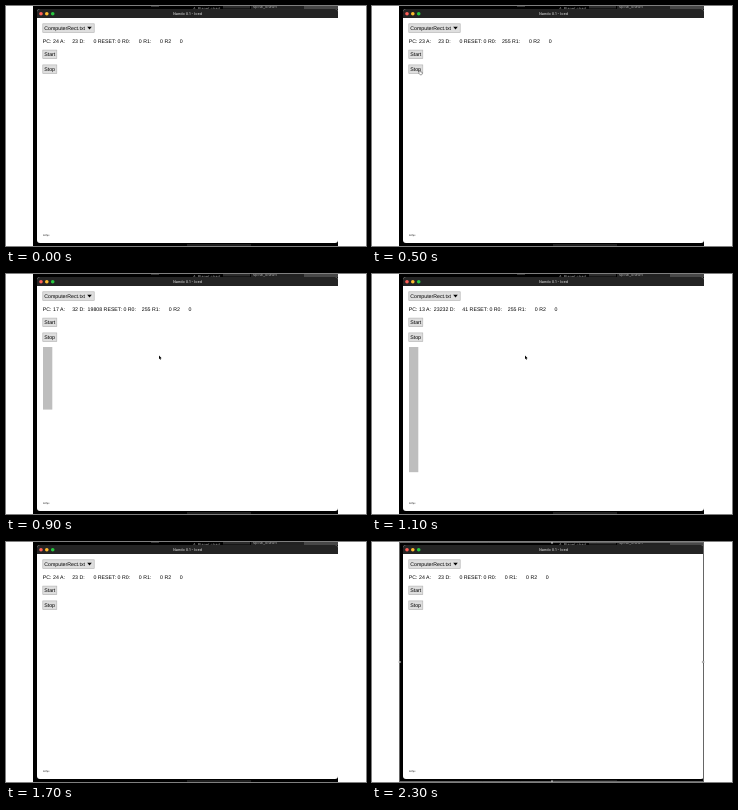
An HTML page for the animation above (2400 ms loop, 360 px wide and 240 px high).

```html
<!DOCTYPE html>
<html lang="en">
<head>
<meta charset="utf-8">
<title>Nando 0.1 - Iced</title>
<style>
  html, body { margin: 0; width: 100%; height: 100%; overflow: hidden; background: #fff; }
  svg { display: block; width: 360px; height: 240px; }
  text {
    font: 5.24px "Liberation Sans", Arial, sans-serif;
    fill: #000;
    white-space: pre;
    text-rendering: geometricPrecision;
  }
  .title { font: 600 3.75px Inter, Roboto, sans-serif; fill: #bcbcbc; text-anchor: middle; }
  .back { font: 4px Inter, Roboto, sans-serif; fill: #a0a0a0; }
  .rate { font: 2.3px "DejaVu Sans", sans-serif; fill: #111; }
  .button { fill: #dedede; stroke: #b0b0b0; stroke-width: .6; }
  .ants { fill: none; stroke: #000; stroke-width: 1; }
  .ants + .ants { stroke: #ccc; stroke-dasharray: 1 1; }
</style>
</head>
<body>
<svg viewBox="0 0 360 240">
  <rect x="27" width="305" height="240" fill="#000"/>
  <!-- slivers of the desktop behind the window -->
  <rect x="145" width="8" height="1" fill="#333"/>
  <rect x="217" width="27" height="2.5" fill="#2c2c2c"/>
  <rect x="245" width="53" height="3" fill="#222"/>
  <rect x="298" width="34" height="3" fill="#484848"/>
  <text class="back" x="247" y="2.2">spiral_drawn</text>
  <text class="back" x="187" y="4.2">A_Planet chart</text>
  <rect x="181" y="238" width="64" height="2" fill="#1e1e1e"/>

  <path d="M31 6a3 3 0 0 1 3-3H329a3 3 0 0 1 3 3V234a3 3 0 0 1-3 3H34a3 3 0 0 1-3-3Z" fill="#fff"/>
  <path d="M31 12V6a3 3 0 0 1 3-3H329a3 3 0 0 1 3 3V12Z" fill="#242424"/>
  <circle cx="35" cy="7.7" r="1.8" fill="#ff5f57"/>
  <circle cx="40.8" cy="7.7" r="1.8" fill="#febc2e"/>
  <circle cx="46.7" cy="7.7" r="1.8" fill="#28c840"/>
  <text class="title" x="181.5" y="9">Nando 0.1 - Iced</text>

  <rect class="button" x="36.8" y="17.8" width="51.4" height="8.6"/>
  <text x="38.3" y="23.9">ComputerRect.txt</text>
  <path d="M81.2 20.8h4.6l-2.3 2.8z"/>
  <text id="regs" x="36.8" y="37.1"></text>
  <rect class="button" x="36.8" y="44.1" width="14" height="8.6"/>
  <text x="38.2" y="50.2">Start</text>
  <rect class="button" x="36.8" y="58.9" width="14" height="8.6"/>
  <text x="38.2" y="65">Stop</text>

  <rect id="bar" x="37" y="73" width="9.3" height="0" fill="#bebebe"/>
  <text class="rate" x="37" y="230.4">60fps</text>
  <g id="pointer">
    <path id="arrow" d="M0 0V3.7L.9 2.9 1.5 4.3 2.1 4 1.5 2.7H2.7Z" stroke="#fff" stroke-width=".5" paint-order="stroke"/>
    <path id="hand" d="M.5 0Q1 0 1 .6V1.6L3 2V3.6L2.5 4.6H.8L-.6 2.6 0 2.3V.6Q0 0 .5 0Z" fill="#fff" stroke="#222" stroke-width=".4"/>
  </g>

  <g id="select">
    <rect class="ants" x="27.5" y=".5" width="304" height="239"/>
    <rect class="ants" x="27.5" y=".5" width="304" height="239"/>
    <g fill="#ddd" stroke="#555" stroke-width=".4">
      <circle cx="180" cy=".8" r="1"/>
      <circle cx="180" cy="239.2" r="1"/>
      <circle cx="27.8" cy="120" r="1"/>
      <circle cx="331.2" cy="120" r="1"/>
    </g>
  </g>
</svg>
<script>
const LOOP = 2400, STEP = 100;
const RUN = 700, RESET = 1600, SELECT = 2100;
const ROWS = 255, ROWS_PER_MS = .535, ROW_HEIGHT = .585;
const SCREEN = 16384, WORDS_PER_ROW = 32;

const $ = id => document.getElementById(id);
const show = (id, on) => $(id).style.display = on ? "" : "none";
const pad = n => String(n).padStart(6);
const clamp = (v, lo, hi) => Math.max(lo, Math.min(hi, v));
const ramp = (t, from, to) => clamp((t - from) / (to - from), 0, 1);
const mix = (a, b, k) => a + (b - a) * k;

// Registers of the program that fills one row after another
function registers(t, row) {
  if (t < 300 || t >= RESET) return [24, 23, 0, 0];
  if (t < RUN || row >= ROWS) return [23, 23, 0, ROWS];
  const address = SCREEN + WORDS_PER_ROW * row;
  const storing = Math.floor((t - RUN) / 200) % 2 === 0;
  return storing ? [13, address, ROWS - row, ROWS] : [17, WORDS_PER_ROW, address, ROWS];
}

function draw(t) {
  const row = t < RESET ? clamp(Math.round((t - RUN) * ROWS_PER_MS), 0, ROWS) : 0;
  const [pc, a, d, r0] = registers(t, row);
  $("regs").textContent =
    `PC: ${pc} A: ${pad(a)} D: ${pad(d)} RESET: 0 R0: ${pad(r0)} R1: ${pad(0)} R2 ${pad(0)}`;
  $("bar").setAttribute("height", row * ROW_HEIGHT);

  // the pointer visits the Stop button, rests mid-window, then returns
  const away = 1 - ramp(t, 200, 500) + ramp(t, 600, 800) - ramp(t, 1200, 1400);
  const x = mix(t < 1000 ? 47.2 : 42.6, 153, away), y = mix(64.2, 81.5, away);
  $("pointer").setAttribute("transform", `translate(${x} ${y})`);
  show("pointer", t >= 200 && t < RESET);
  show("hand", away < .05);
  show("arrow", away >= .05);

  show("select", t >= SELECT);
}

function tick() {
  const t = performance.now() % LOOP;
  draw(Math.floor(t / STEP) * STEP);
  requestAnimationFrame(tick);
}
tick();
</script>
</body>
</html>
```
